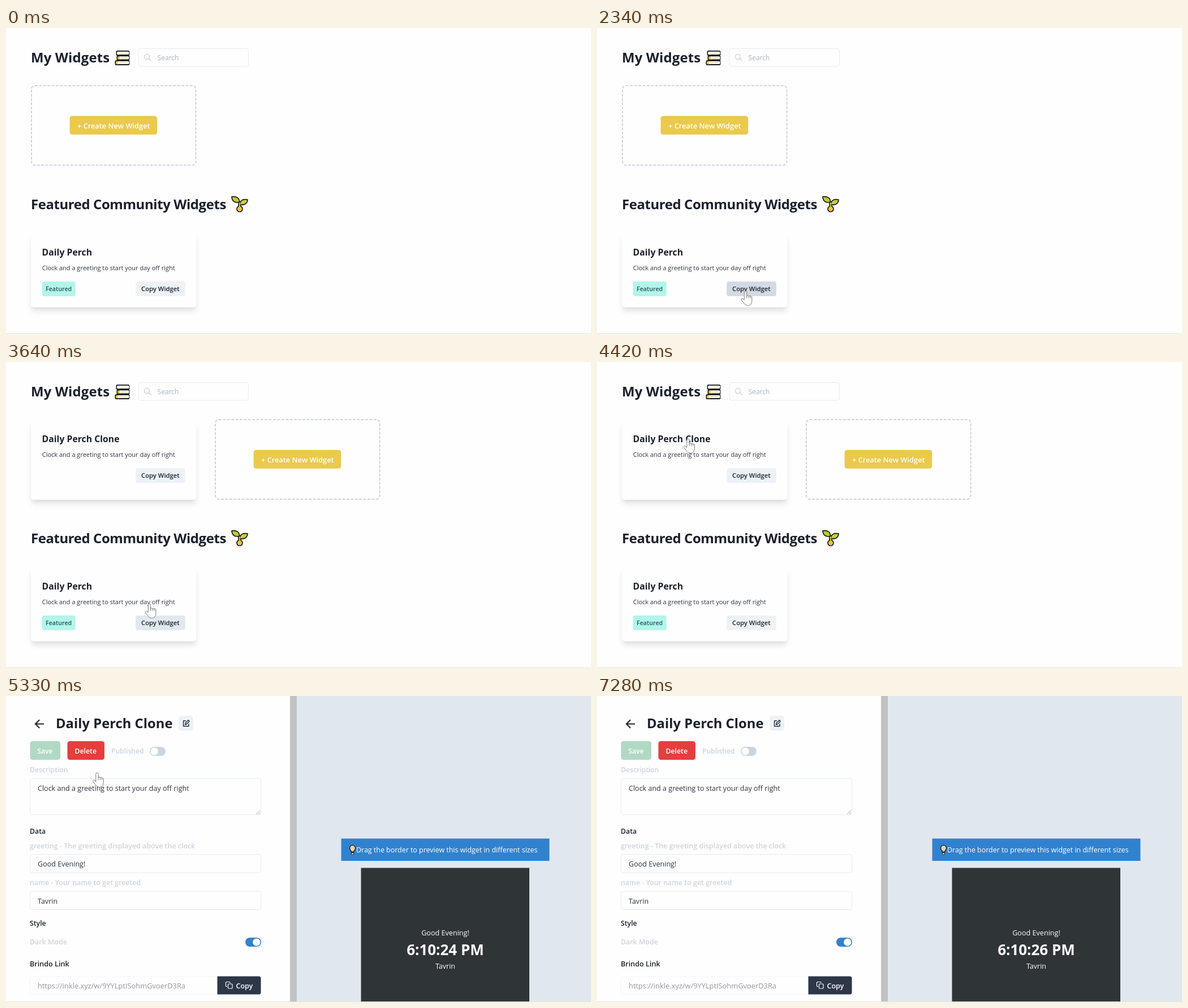
An HTML page that plays this animation: 1034x542 px, repeating every 7410 ms.

```html
<!DOCTYPE html>
<html lang="en">
<head>
<meta charset="utf-8">
<title>Widget dashboard</title>
<style>
  html, body { margin: 0; width: 100%; height: 100%; overflow: hidden; background: #fefefe; }
  svg { display: block; width: 1034px; height: 542px; }
  text { font-family: "Open Sans", "Noto Sans", sans-serif; white-space: pre; }
  .shadow { filter: drop-shadow(0 7px 5px rgba(0,0,0,.10)) drop-shadow(0 2px 2px rgba(0,0,0,.04)); }
  .ink { stroke: #16191f; stroke-width: 1.7; stroke-linejoin: round; stroke-linecap: round; }
</style>
</head>
<body>
<svg id="stage" viewBox="0 0 1034 542" xmlns="http://www.w3.org/2000/svg"></svg>
<script>
const LOOP = 7410, STEP = 130;
const COPIED = 2860, LOADING = 4940, EDITOR = 5330;
const DARK = '#1a202c', PALE = '#cbd5e0', LINE = '#e6ebf1', SOFT = '#edf2f7';

const text = (x, y, size, str, { fill = DARK, weight = 400, gap = 0, mid = false, id = '' } = {}) =>
  `<text x="${x}" y="${y}" font-size="${size}" font-weight="${weight}" fill="${fill}"` +
  `${gap ? ` letter-spacing="${gap}"` : ''}${mid ? ' text-anchor="middle"' : ''}${id ? ` id="${id}"` : ''}>${str}</text>`;

// Rectangle given by its edges
const box = (x1, y1, x2, y2, fill, r = 0, extra = '') =>
  `<rect x="${x1}" y="${y1}" width="${x2 - x1}" height="${y2 - y1}" rx="${r}" fill="${fill}" ${extra}/>`;

const field = (x1, y1, x2, y2, stroke = LINE) =>
  box(x1 + .5, y1 + .5, x2 - .5, y2 - .5, '#fefefe', 4, `stroke="${stroke}"`);

const toggle = (x, y, on) =>
  box(x, y, x + 28, y + 16, on ? '#3182ce' : PALE, 8) +
  `<circle cx="${x + (on ? 19.8 : 8.2)}" cy="${y + 8}" r="6.6" fill="#fff"/>`;

const bold = { weight: 700 }, semi = { weight: 600 };
const label = { weight: 600, fill: PALE };
const white = { weight: 600, fill: '#fff' };
const about = 'Clock and a greeting to start your day off right';

const card = (y, height, title, id) => `
  <g transform="translate(44 ${y})">
    ${box(1, 3, 291.5, height, '#fefefe', 5, 'class="shadow"')}
    ${box(0, 0, 292.5, height, '#fefefe', 5)}
    ${text(19.5, 40, 15.8, title, bold)}
    ${text(19.7, 66, 11, about, { fill: '#2d3440' })}
    ${box(185.2, 86, 272.8, 112, SOFT, 4, `id="${id}"`)}
    ${text(195, 103.3, 11.25, 'Copy Widget', semi)}
  </g>`;

const book = (x, y, w, spine) =>
  box(x, y, x + w, y + 9, '#16191f', 2.5) +
  box(x + 1.6, y + 1.8, x + 8, y + 7.2, spine, 1.5) +
  box(x + 5, y + 1.8, x + w - 1, y + 7, '#fbf6e6', 1.5) +
  box(x + 8, y + 4, x + w - 4, y + 4.8, '#d9d0b4');

const books = book(194.5, 40, 24, '#fbf6e6') + book(195.5, 48.5, 23, '#e8b93a') + book(192.5, 57, 26, '#f0c445');

const sprout = `
  <path d="M413 307V317" stroke="#16191f" stroke-width="5.5"/>
  <path class="ink" fill="#bfc92f" d="M399 298.800c8-1 14 2 13.500 9.700-6.500 1.500-13 0-13.500-9.700z"/>
  <path class="ink" fill="#c9cf33" d="M427 304c-8-1.500-13.500 1-13.500 8.500 6.500 2 13-.5 13.500-8.500z"/>
  <circle class="ink" cx="413" cy="320.500" r="5" fill="#eec13c"/>
  <path d="M413 309V317" stroke="#bfc92f" stroke-width="2.200"/>`;

const list = `
<g id="list">
  ${text(44, 60.5, 24, 'My Widgets', { weight: 700, gap: .1 })}${books}
  ${field(233.5, 36, 429, 68.5)}
  <g fill="none" stroke="${PALE}" stroke-width="1.4" stroke-linecap="round">
    <circle cx="249" cy="51" r="4.500"/><path d="M252.300 54.300l3.700 3.700"/></g>
  ${text(267.5, 57.3, 12.1, 'Search', { fill: '#a9b4c4' })}
  <g id="copy">${card(102, 142, 'Daily Perch Clone', 'copyBtn')}</g>
  <g id="create">
    ${box(45, 102, 335.5, 243, 'none', 6, `stroke="${PALE}" stroke-width="2" stroke-dasharray="4.8 2.6"`)}
    ${box(112.6, 155.8, 267.2, 188.8, '#eac94c', 4.5)}
    ${text(126, 177.6, 12.8, '+ Create New Widget', white)}
  </g>
  ${text(44, 321, 24, 'Featured Community Widgets', { weight: 700, gap: -.44 })}${sprout}
  ${card(363, 131.5, 'Daily Perch', 'cardBtn')}
  ${box(63.7, 449, 122.7, 475, '#b2f5ea', 4)}
  ${text(70, 466.2, 10.7, 'Featured', { weight: 600, fill: '#2c5157' })}
</g>`;

const loader = `
<g id="loader" fill="none" stroke-width="3.400">
  <circle cx="515" cy="427.500" r="18" stroke="#e5e7eb"/>
  <path id="arc" d="M533 427.500a18 18 0 0 1-36 0" stroke="#d4a548"/>
</g>`;

const editor = `
<g id="editor">
  <path d="M67 49.500H52m7.200-7.300l-7.300 7.300 7.300 7.300" fill="none" stroke="${DARK}" stroke-width="2"/>
  ${text(88, 57, 23.8, 'Daily Perch Clone', bold)}
  ${box(305, 35, 331, 61.5, SOFT, 5)}
  <path d="M318 44h-4.500v9.500h9.500V49M316.500 50.500l.5-2.500 5.200-5.200 2 2-5.200 5.200z"
    fill="none" stroke="${DARK}" stroke-width="1.300" stroke-linejoin="round"/>
  ${box(42.5, 80, 96, 113, '#b0d9c3', 4.5)}${text(55.3, 102, 12.2, 'Save', white)}
  ${box(108.5, 80, 174, 113, '#e53e3e', 4.5)}${text(121.5, 102, 12.3, 'Delete', white)}
  ${text(186, 102, 12.1, 'Published', label)}${toggle(254, 90, false)}
  ${text(42, 134.6, 12.2, 'Description', label)}
  ${field(42, 145.5, 451, 211)}
  ${text(56, 167.6, 12.54, about, { fill: '#2d3440' })}
  <path d="M442 209.500l7-7M446 209.500l3-3" stroke="#8b8f95" stroke-width=".9"/>
  ${text(42, 244, 12.3, 'Data', semi)}
  ${text(42, 269.7, 12.48, 'greeting - The greeting displayed above the clock', label)}
  ${field(42, 280, 451, 313.5)}${text(56, 302.3, 12.55, 'Good Evening!', { fill: '#2d3440' })}
  ${text(42, 335, 12.4, 'name - Your name to get greeted', label)}
  ${field(42, 345.5, 451, 379)}${text(56, 367.6, 12.5, 'Tavrin', { fill: '#2d3440' })}
  ${text(42, 407, 12.3, 'Style', semi)}
  ${text(42, 439.6, 12.4, 'Dark Mode', label)}${toggle(423, 428, true)}
  ${text(42, 478.7, 12.6, 'Brindo Link', semi)}
  ${field(42, 496.5, 376, 528.5, '#f3f5f8')}
  ${text(56, 518, 12.85, 'https://inkle.xyz/w/9YYLptISohmGvoerD3Ra', { fill: '#92969c' })}
  <path d="M373.500 496.500H447q3.500 0 3.500 3.500v25q0 3.500-3.500 3.500h-73.500z" fill="#2d3748"/>
  <g fill="none" stroke="#fff" stroke-width="1.200"><rect x="392.500" y="510" width="7.500" height="8" rx="1"/>
    <path d="M391 514.500h-1.500q-1 0-1-1V507.500q0-1 1-1h5.500q1 0 1 1V508.500"/></g>
  ${text(406.5, 518, 12.5, 'Copy', white)}
  ${box(502, 0, 514, 542, '#c2c2c2')}${box(514, 0, 1034, 542, '#e1e7ef')}
  ${box(592.5, 252.5, 960.5, 292, '#3182ce')}
  <path d="M610.300 276c0-2.500-2.800-3.500-2.800-6.600a5 5 0 0 1 10 0c0 3.100-2.800 4.100-2.800 6.600z" fill="#f6d3a4"
    stroke="#16191f" stroke-width="1.300"/>
  <path d="M610.500 277.500h4v2.500l-2 1.500-2-1.500z" fill="#c9ccd1" stroke="#16191f"/>
  ${text(619, 277.3, 12.44, 'Drag the border to preview this widget in different sizes', { fill: '#fff' })}
  ${box(627.5, 304.5, 925, 542, '#2f3437')}
  ${text(776.5, 424.3, 12.6, 'Good Evening!', { fill: '#fff', mid: true })}
  ${text(776.5, 459, 26, '', { fill: '#fff', weight: 700, mid: true, id: 'clock' })}
  ${text(776.5, 483, 12.5, 'Tavrin', { fill: '#fff', mid: true })}
</g>`;

// Hand pointer with its fingertip at the origin
const hand = `
<g id="hand" fill="#fff" stroke-linejoin="round">
  <path d="M-2.200 2.200a2.200 2.200 0 0 1 4.400 0V9c.2-1.800 3.200-1.700 3.400.2.300-1.500 3-1.300 3.100.6.500-1.200 2.600-.8 2.600 1.200v6.500
    c0 4.500-2.500 8-7 8-4 0-6-2.500-8-5.200l-3.300-4.500c-1.500-2 .8-3.600 2.400-2.400l2.400 2z"/>
  <path fill="none" d="M2.200 8.500v4.300M5.600 9v3.800M8.700 9.500v3.300"/>
</g>`;

const stage = document.getElementById('stage');
stage.innerHTML = box(0, 0, 1034, 542, '#fefefe') + list + loader + editor +
  box(0, 541, 1034, 542, '#e4e5e7') + hand;
const el = id => document.getElementById(id);
const show = (id, on) => el(id).setAttribute('visibility', on ? 'visible' : 'hidden');

// Pointer stops: time, x, y
const path = [
  [520, 152, 509], [1170, 199.5, 477.5], [1690, 262.5, 466], [3510, 262.5, 466],
  [3640, 253.5, 428], [4290, 165, 141], [4420, 161, 136], [5850, 161, 136], [6630, 205, 502]
];

function pointer(t) {
  const i = path.findIndex(p => p[0] > t);
  if (i < 1) return path[path.length - 1];
  const [a, b] = [path[i - 1], path[i]];
  const k = (t - a[0]) / (b[0] - a[0]);
  return a.map((v, n) => v + (b[n] - v) * k);
}

function buttonColor(t) {
  if (t >= 2210 && t < 2600) return '#d2dae5';
  return t >= 1560 && t <= 3640 ? '#e2e8f0' : SOFT;
}

function draw(t) {
  const copied = t >= COPIED;
  const loading = t >= LOADING && t < EDITOR;
  show('list', t < LOADING);
  show('loader', loading);
  show('editor', t >= EDITOR);
  el('copy').style.display = copied ? '' : 'none';
  el('create').setAttribute('transform', `translate(${copied ? 325 : 0} 0)`);
  el('cardBtn').setAttribute('fill', buttonColor(t));

  const turn = -14 + (t - 5200) / 650 * 360;
  el('arc').setAttribute('transform', `rotate(${turn} 515 427.500)`);
  el('clock').textContent = `6:10:${24 + (t >= 5980) + (t >= 6980)} PM`;

  show('hand', t >= 520 && t < 6760);
  const [, x, y] = pointer(t);
  el('hand').setAttribute('transform', `translate(${x} ${y})`);
  el('hand').setAttribute('stroke', loading ? '#b39a80' : '#75787d');
}

const start = performance.now();
function tick() {
  const t = (performance.now() - start) % LOOP;
  draw(Math.floor(t / STEP) * STEP);
  requestAnimationFrame(tick);
}
tick();
</script>
</body>
</html>
```
